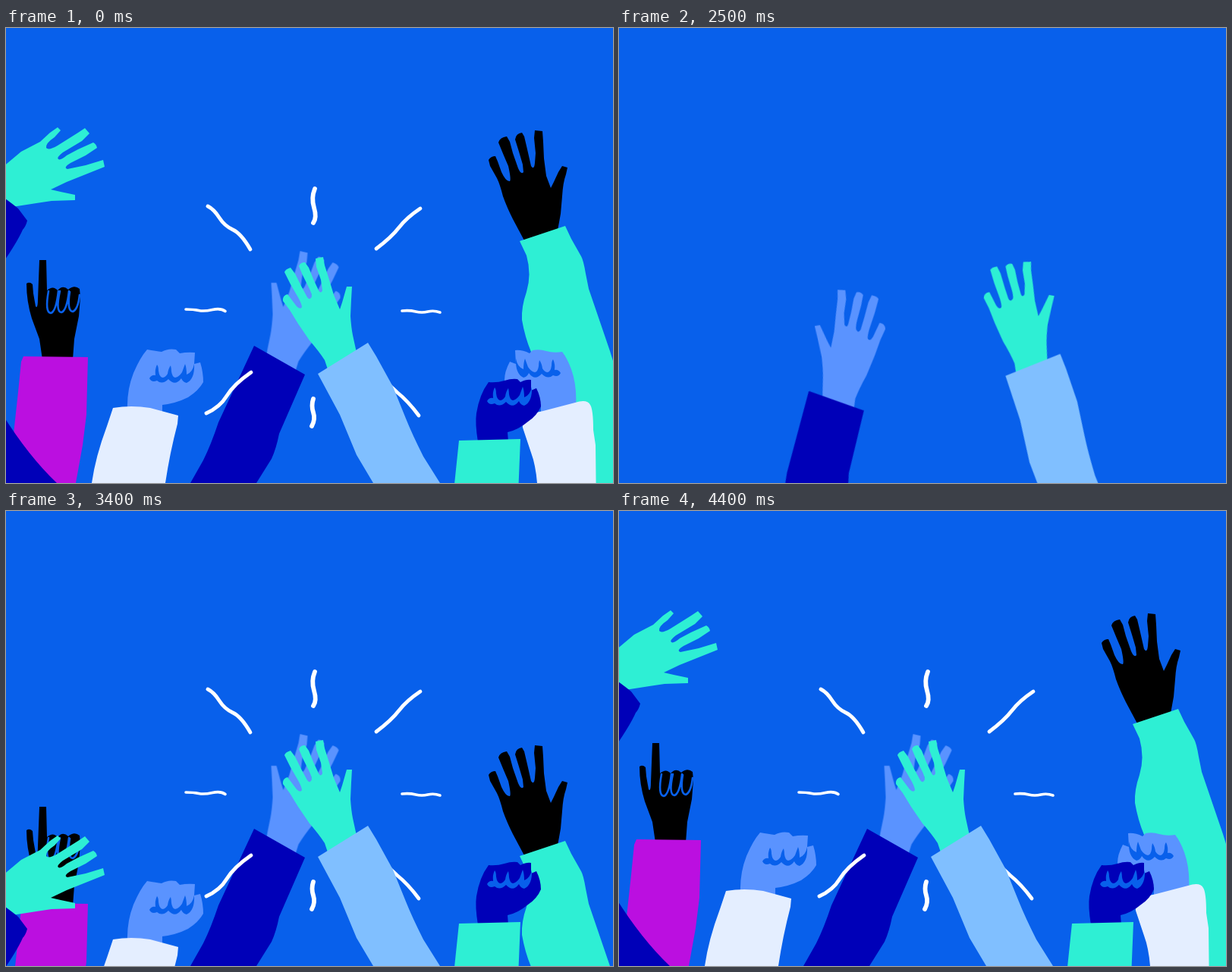
Recreate the animation shown at these times as an HTML page without scripts. Size 800 by 600 pixels, loop 4500 ms.

```html
<!DOCTYPE html>
<html lang="en">
<head>
<meta charset="utf-8">
<title>High five</title>
<style>
:root { --bg: #0860eb; --teal: #2eefd4; --sky: #5a93ff; --navy: #0000b8; --pale: #e4eeff }
html, body { margin: 0; width: 100%; height: 100%; overflow: hidden; background: var(--bg) }
svg { display: block; width: 100vw; height: 100vh }
g { animation: 4500ms step-end infinite }

.teal { fill: var(--teal) }
.sky { fill: var(--sky) }
.navy { fill: var(--navy) }
.pale { fill: var(--pale) }
.knuckles { fill: var(--bg) }
.creases { fill: none; stroke: var(--bg); stroke-width: 2.6; stroke-linecap: round }
.rays { fill: none; stroke: #fff; stroke-width: 4.8; stroke-linecap: round; animation-name: flash }
.thin { stroke-width: 3.6 }
.thick { stroke-width: 5.8 }

.crowd { animation-name: fade }
.rise { animation-name: rise }
.pump { animation-name: rise, bob }
.wave { animation-name: rise, wave; transform-origin: 740px 510px }
.punch { animation-name: punch }
.clap-l { animation-name: clap-l; transform-origin: 388px 360px }
.clap-r { animation-name: clap-r; transform-origin: 416px 360px }

/* ten poses a second: 100 ms is 2.22% */
@keyframes fade {
  0% { opacity: 1 }
  2.2% { opacity: .5 }
  4.4% { opacity: 0 }
  50%, 100% { opacity: 1 }
}
@keyframes flash {
  0% { visibility: visible }
  4.4% { visibility: hidden }
  64.4%, 100% { visibility: visible }
}
@keyframes rise {
  0% { translate: 0 0 }
  4.4% { translate: 0 600px }
  68.8% { translate: 0 var(--d) }
  71.1% { translate: 0 calc(var(--d) * .9) }
  73.3% { translate: 0 calc(var(--d) * .62) }
  75.5% { translate: 0 calc(var(--d) * .3) }
  77.7% { translate: 0 calc(var(--d) * .08) }
  79.9%, 100% { translate: 0 0 }
}
@keyframes bob {
  0%, 88.8%, 93.3%, 100% { transform: none }
  82.2%, 86.6%, 91.1% { transform: translateY(14px) }
  84.4% { transform: translateY(27px) }
}
@keyframes wave {
  0%, 88.8%, 97.7%, 100% { rotate: 0deg }
  82.2%, 86.6%, 91.1%, 95.5% { rotate: -3deg }
  84.4%, 93.3% { rotate: -5.7deg }
}
@keyframes punch {
  0% { translate: 0 0 }
  4.4% { translate: 0 200px }
  68.8% { translate: 0 110px }
  71.1% { translate: 0 55px }
  73.3% { translate: 0 15px }
  75.5%, 84.4%, 93.3%, 100% { translate: 0 0 }
  77.7%, 82.2%, 86.6%, 91.1% { translate: 0 14px }
  79.9%, 88.8% { translate: 0 27px }
}
@keyframes clap-r {
  0% { transform: none }
  4.4% { transform: translate(300px, 600px) }
  51.1% { transform: translate(270px, 231px) rotate(11.5deg) }
  53.3% { transform: translate(190px, 105px) rotate(11deg) }
  55.5% { transform: translate(115px, 5px) rotate(10deg) }
  57.7% { transform: translate(60px, -48px) rotate(8deg) }
  59.9% { transform: translate(22px, -30px) rotate(4deg) }
  62.2%, 100% { transform: none }
}
@keyframes clap-l {
  0% { transform: none }
  4.4% { transform: translate(-150px, 600px) }
  53.3% { transform: translate(-120px, 180px) rotate(-11deg) }
  55.5% { transform: translate(-88px, 50px) rotate(-10deg) }
  57.7% { transform: translate(-52px, -48px) rotate(-8deg) }
  59.9% { transform: translate(-20px, -30px) rotate(-4deg) }
  62.2%, 100% { transform: none }
}
</style>
</head>
<body>
<svg viewBox="0 0 800 600" preserveAspectRatio="none">
  <defs>
    <path id="knuckles" d="M189 462Q192 457 197 458Q196 450 199 444Q201 446 201 452Q202 460 206 461Q210 461 213 456Q214 449 217 445Q218 449 218 453Q219 460 223 461Q228 460 232 454L236 443Q238 448 238 457Q246 454 248 443Q249 463 238 468Q233 467 231 462Q223 473 214 463Q206 471 199 465Q192 468 189 462Z"/>
    <path id="palm" d="M424 450L420 438Q413 427 400 412L385 390L374 372L365 360Q364 353 371 351L377 359L383 367Q388 372 390 368Q390 365 386 357L375 338L367 322Q368 318 375 316L381 324L390 342L397 355Q401 360 403 354Q403 350 399 342L391 326L386 314Q388 309 394 309L399 316L405 331L412 346Q415 351 417 346L415 332L409 315L408 304L418 302L420 313L426 332L432 352L440 371L443 362L447 348L449 341H456L455 358L454 380Q455 395 457 405L462 428Z"/>
  </defs>

  <g class="crowd">
    <g class="wave" style="--d:580px">
      <path d="M684 282L668 252Q660 236 655 222Q651 206 647 198L638 182L636 174Q639 169 645 169L648 176L653 190Q659 203 664 202Q666 200 662 182L656 168L649 151Q651 144 660 143L664 150L668 165L675 185Q679 194 682 190L681 180L676 163L671 147Q672 139 680 138L683 143L687 160L692 182Q696 188 697 178L698 165L696 145L697 135L707 136L708 150L709 172L712 195L718 211L722 203L728 190L733 182L740 184L738 193Q734 204 733 222L731 245L727 267Z"/>
      <path class="teal" d="M677 281L737 261L745 278L758 301Q761 306 764 324L768 344L796 426L862 640H735L710 500L692 427Q684 408 680 385Q679 368 686 348Q693 325 686 300Z"/>
    </g>

    <g class="pump" style="--d:600px">
      <path class="sky" d="M751 502Q753 472 745 450Q740 436 733 427Q722 429 712 426Q703 423 694 425L690 429Q680 424 671 425L672 443L664 440Q657 453 657 464Q661 479 676 487Q690 494 705 496V508Z"/>
      <use class="knuckles" href="#knuckles" transform="translate(920 -7) scale(-1 1)"/>
      <path class="pale" d="M680 511L708 505L750 494Q766 489 770 497Q774 503 774 530L777 550L778 640H707L700 600Q698 576 692 560L681 527Z"/>
    </g>

    <g class="punch">
      <path class="navy" d="M622 546Q618 521 620 508Q624 483 636 467Q647 468 657 465Q666 462 674 463L678 467Q686 463 692 464L692 478L699 475Q705 487 705 499Q700 511 688 519Q675 530 661 533L662 546Z"/>
      <use class="knuckles" href="#knuckles" transform="translate(445 30)"/>
      <path class="teal" d="M597 544L678 542L674 640H587Z"/>
    </g>

    <g class="pump" style="--d:280px">
      <path d="M44 306L53 306L54 346Q62 339 68 346Q75 338 82 345Q90 338 97 344L98 355L96 380L90 410L88 437H48L44 410L34 383Q27 360 27 337Q31 334 35 338L36 350L39 367Q42 371 42 358Z"/>
      <path class="creases" d="M56 347Q51 375 59 376Q66 374 69 347M71 347Q65 374 73 375Q80 373 83 347M84 348Q80 373 88 374Q95 371 97 352"/>
      <path fill="#bb0fe0" d="M23 433L108 434L106 510L101 550L92 600L84 640H-6L10 535L16 480L20 440Z"/>
    </g>

    <g class="pump" style="--d:213px">
      <path class="sky" d="M160 504Q159 478 168 455Q177 434 186 424Q198 426 205 427Q214 422 224 424L229 429Q239 427 249 428L248 443L256 441Q260 454 260 467Q254 478 240 487Q224 495 206 497V508Z"/>
      <use class="knuckles" href="#knuckles"/>
      <path class="pale" d="M141 501Q165 497 190 501L227 511L226 522Q216 560 210 600L203 640H107L113 600Q118 565 133 525Z"/>
    </g>

    <g class="rise" style="--d:990px">
      <path class="teal" d="M-5 184L20 163L45 150L58 138L68 131L72 135L64 144Q52 152 53 158Q56 162 68 155L95 138L104 132L110 139L100 149L75 164Q66 171 69 173Q72 175 80 168L95 160L115 151Q119 153 120 158L105 168L85 178Q75 184 81 186L105 181L128 174L130 183L110 191L80 203L59 213L72 216L91 220V227L60 228L40 231L8 236L-5 232Z"/>
      <path class="navy" d="M-5 222Q10 233 16 238L28 254Q26 262 22 266Q15 282 -5 311ZM-5 509Q30 565 67 600L100 640H-5Z"/>
    </g>

    <g class="clap-l">
      <use class="sky" href="#palm" transform="translate(805.5 -29) scale(-1 1.07)"/>
      <path class="navy" d="M327 419L394 457L360 535Q356 555 350 568L330 600L262 720H175L243 600L260 570Q270 550 280 520Z"/>
    </g>

    <g class="rays">
      <path d="M266 235Q274 239 281 250T299 266T322 292M546 238Q528 250 518 263T488 291M264 508Q282 500 291 485T323 454M544 511Q530 492 515 480L500 466"/>
      <path class="thick" d="M407 212Q402 224 406 237T405 257M405 489Q402 498 405 507T403 525"/>
      <path class="thin" d="M237 371Q247 371 254 372.5T272 371.5T289 373.5M522 373Q532 372 540 374T556 374T572 375"/>
    </g>

    <g class="clap-r">
      <use class="teal" href="#palm"/>
      <path fill="#80bfff" d="M411 456L477 415L488 433L510 473L527 515Q535 535 550 565L572 600L640 720H552L484 600L462 563L440 510Z"/>
    </g>
  </g>
</svg>
</body>
</html>
```
